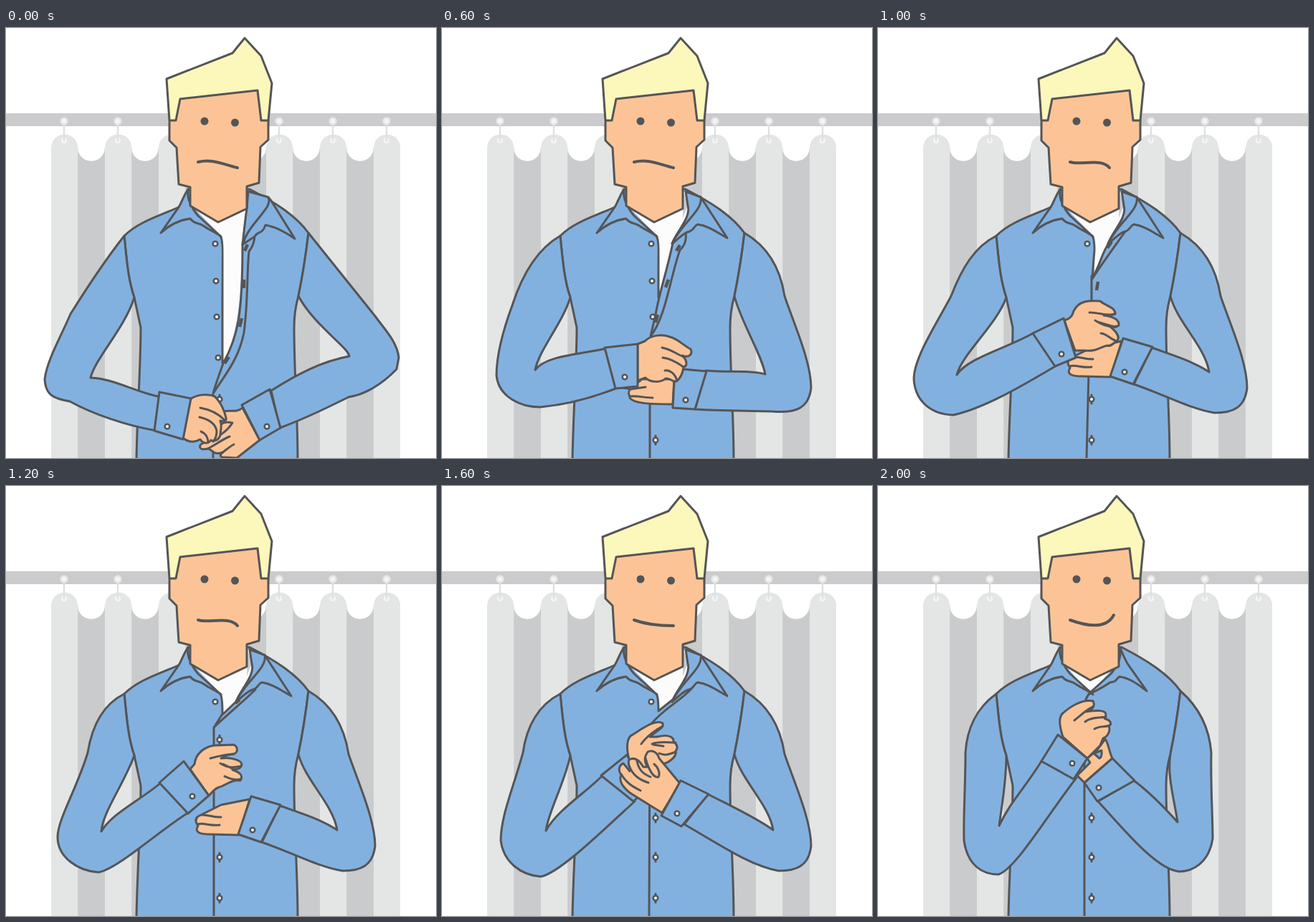
An HTML page without scripts that plays this animation: 600 px wide and 600 px high, repeating every 3000 ms.

```html
<!DOCTYPE html>
<html lang="en">
<head>
<meta charset="utf-8">
<title>Buttoning a shirt</title>
<style>
  html, body { margin: 0; width: 100%; height: 100%; overflow: hidden; background: #fff; }
  svg { display: block; width: 100vw; height: 100vh; }
  .ink { stroke: #545557; stroke-width: 3; stroke-linecap: round; stroke-linejoin: round; fill: none; }
  .shirt { fill: #82b1e0; }
  .skin { fill: #fcc496; }
  .tee { fill: #fcfcfc; stroke: none; }
  .hair { fill: #fcf7bb; }
  .dot { fill: #545557; stroke: none; }
  .hole { stroke-width: 4.5; stroke-linecap: butt; }
  .mouth { stroke-width: 4; }

  /* each pose is held for one 200 ms step, the last for five */
  .pose { visibility: hidden; animation: step 3s step-end calc(var(--i) * 200ms) infinite; }
  .last { animation-name: hold; }
  @keyframes step { 0% { visibility: visible; } 6.6667%, 100% { visibility: hidden; } }
  @keyframes hold { 0% { visibility: visible; } 33.3333%, 100% { visibility: hidden; } }
</style>
</head>
<body>
<svg viewBox="0 0 600 600">
<defs>
  <pattern id="folds" x="63" y="0" width="75" height="600" patternUnits="userSpaceOnUse">
    <path d="M37 167H75V600H37Z" fill="#cacbcd"/>
    <circle cx="56" cy="167" r="18.8" fill="#fff"/>
    <path d="M0 600V167A18.6 18.6 0 0 1 37.2 167V600Z" fill="#e4e6e5"/>
    <g fill="#f4f4f4" stroke="#e4e6e5" stroke-width="2.5">
      <circle cx="18" cy="157" r="3" stroke="#f4f4f4"/>
      <circle cx="18" cy="157" r="1.5" stroke="none" fill="#e4e6e5"/>
      <path d="M18 134V156" stroke="#dfe0e0"/>
      <circle cx="18" cy="130" r="4.5"/>
    </g>
  </pattern>

  <circle id="button" r="3.3" fill="#fff" stroke-width="2.6"/>
  <g id="done"><path d="M0-6V6"/><use href="#button"/></g>
  <g id="low"><use href="#done" x="298" y="518"/><use href="#done" x="298" y="575"/></g>

  <g id="head">
    <path class="skin" d="M228 129V157L238 167 241 218 257 222V248L296 271 336 252V221L353 216 355 166 366 156V129L351 80 243 90Z"/>
    <path class="hair" d="M224 71L316 35 333 14 356 39 371 77 366 129H356L351 87 243 99 237 129H228Z"/>
    <circle class="dot" cx="277" cy="130" r="5.5"/>
    <circle class="dot" cx="319.5" cy="132" r="5.5"/>
  </g>
  <path id="wing" class="shirt" d="M254 225C247 235 246 242 241 250L216 286C228 275 240 268 257 266C264 275 268 270 277 277C285 283 292 284 300 291L268 262C258 250 252 238 254 225Z"/>
  <g id="lapel">
    <path d="M337 228L343 248 336 265Z" fill="#cacbcd" stroke="none"/>
    <path class="shirt" d="M340 228L361 236 398 293C385 286 372 276 357 274C352 275 353 281 345 284C336 286 332 293 321 301C326 285 348 265 343 248Z"/>
    <path d="M361 236C365 254 333 274 321 301"/>
  </g>

  <g id="front0">
    <path class="tee" d="M257 246L300 290 302 468C320 435 328 400 330 300L338 228Z"/>
    <path d="M299 290Q302 294 302 310V467M330 301C330 400 324 430 303 468C297 485 292 498 289 510C305 485 325 462 332 425C338 380 336 340 339 312Q347 302 347 288M289 510V600"/>
    <path class="hole" d="M337 302L333 311M332 351V363M329 405L326 417M311 459L305 468"/>
    <use href="#button" x="292" y="301"/><use href="#button" x="293" y="353"/>
    <use href="#button" x="294" y="403"/><use href="#button" x="296" y="460"/>
    <use href="#done" x="298" y="518"/>
    <use href="#wing"/>
    <path class="shirt" d="M338 228L366 236 370 241 403 294C390 285 375 277 362 275C358 288 350 284 347 291L330 302C332 285 334 265 336 252Z"/>
    <path d="M366 237C374 250 337 274 331 301"/>
    <use href="#head"/>
  </g>
  <g id="front1">
    <path class="tee" d="M257 246L300 290 302 405C312 370 318 320 322 300L345 255 340 228Z"/>
    <path d="M299 290Q302 294 302 310V408M322 300C316 345 308 380 303 408L296 470M336 288C340 302 330 300 329 325C322 370 315 420 297 470M290 478L288 600"/>
    <path class="hole" d="M332 302L328 311M322 350L319 362M311 404L308 416"/>
    <use href="#button" x="292" y="301"/><use href="#button" x="293" y="353"/><use href="#button" x="294" y="403"/>
    <use href="#wing"/><use href="#lapel"/><use href="#head"/>
  </g>
  <g id="front2">
    <path class="tee" d="M257 246L300 290 302 375C310 345 316 320 322 300L345 255 340 228Z"/>
    <use href="#button" x="292" y="301"/><use href="#button" x="293" y="353"/><use href="#button" x="294" y="403"/>
    <path d="M299 290Q302 294 302 310V376M322 300C315 335 303 370 298 400L291 430C312 405 319 345 332 310Q342 300 340 287M290 440V600"/>
    <path class="hole" d="M332 303L327 311M316 351L312 362M301 400L298 411"/>
    <use href="#done" x="298" y="575"/>
    <use href="#wing"/><use href="#lapel"/><use href="#head"/>
  </g>
  <g id="front3">
    <path class="tee" d="M257 246L300 290 302 340 322 300 345 255 340 228Z"/>
    <path d="M299 290Q302 294 302 310L299 348M322 300C312 315 310 330 299 350C315 325 330 305 345 284M298 346V385M294 480L291 600"/>
    <path class="hole" d="M326 298L320 307M307 354L305 366"/>
    <use href="#button" x="292" y="301"/><use href="#low"/>
    <use href="#wing"/><use href="#lapel"/><use href="#head"/>
  </g>
  <g id="front4">
    <path class="tee" d="M257 246L300 290 302 319 322 300 345 255 340 228Z"/>
    <path d="M299 290Q302 294 302 318L290 337V600M302 319L322 300M290 337C305 322 330 302 348 284"/>
    <path class="hole" d="M326 298L320 303"/>
    <use href="#button" x="292" y="301"/><use href="#done" x="298" y="354"/><use href="#low"/>
    <use href="#wing"/><use href="#lapel"/><use href="#head"/>
  </g>
  <g id="front5">
    <path class="tee" d="M257 246L300 290 302 314 322 300 345 255 340 228Z"/>
    <path d="M299 290Q302 294 302 314L322 298M292 332C310 310 330 302 348 283M290 340L289 600"/>
    <use href="#button" x="292" y="301"/><use href="#done" x="298" y="463"/><use href="#low"/>
    <use href="#wing"/><use href="#lapel"/><use href="#head"/>
  </g>
  <g id="front6">
    <path class="tee" d="M257 246L296 289 336 246Z"/>
    <path d="M296 289Q288 296 288 310V600"/>
    <use href="#done" x="298" y="463"/><use href="#low"/>
    <use href="#wing"/>
    <path class="shirt" d="M338 226C342 236 346 246 351 252L375 286C364 278 352 268 337 266C331 270 334 273 324 274C315 280 306 286 294 290L325 262C335 250 340 238 338 226Z"/>
    <use href="#head"/>
  </g>

  <!-- sleeves: ls on the left of the stage, rs on the right -->
  <path id="ls0" class="shirt" d="M165 290C138 324 112 364 90 399C76 432 57 464 54 490C55 512 66 517 89 521C120 538 165 554 210 562L216 515C180 508 150 489 118 488C125 460 165 420 179 376C170 350 168 320 165 290Z"/>
  <path id="ls1" class="shirt" d="M165 290C130 310 110 350 98 387C80 430 67 470 67 492C69 520 90 525 115 527C160 530 205 527 250 531L240 476C200 472 160 475 128 473C132 450 168 415 179 376C170 350 168 320 165 290Z"/>
  <path id="ls2" class="shirt" d="M165 290C130 310 110 350 98 387C84 425 76 460 76 485C79 515 110 529 137 529C180 525 220 512 245 502L230 447C190 456 145 457 130 477C135 450 168 412 179 376C170 350 168 320 165 290Z"/>
  <path id="ls3" class="shirt" d="M165 290C135 305 117 335 102 374C82 412 50 460 50 490C52 522 75 539 105 540C150 530 205 497 249 471L218 425C180 447 125 460 110 484C117 455 165 415 179 376C170 350 168 320 165 290Z"/>
  <path id="ls4" class="shirt" d="M165 290C135 305 120 335 114 372C100 420 72 465 72 490C72 518 100 537 129 539C155 535 215 480 254 456L216 414C190 437 148 456 133 482C135 455 165 415 179 376C170 350 168 320 165 290Z"/>
  <path id="ls5" class="shirt" d="M165 290C135 305 118 335 113 372C100 420 82 460 82 495C86 525 110 543 138 545C165 540 230 475 269 440L224 404C198 430 160 453 145 481C148 455 171 415 179 376C170 350 168 320 165 290Z"/>
  <path id="ls6" class="shirt" d="M165 290C137 310 124 340 122 372C122 420 119 460 120 495C125 529 145 542 168 542C192 535 240 454 277 407L228 384C206 420 185 440 169 474C172 450 179 415 179 376C170 350 168 320 165 290Z"/>
  <path id="rs0" class="shirt" d="M422 286L515 402C528 420 546 438 548 460L545 476C525 497 500 512 478 515C448 530 415 546 382 558L370 506C405 484 440 465 479 458C478 446 430 415 408 374C414 345 418 320 422 286Z"/>
  <path id="rs1" class="shirt" d="M422 286C455 305 472 335 478 374C492 410 505 460 507 489C490 508 470 515 448 522C418 540 388 558 357 573L344 521C380 500 410 476 441 471C437 450 420 410 408 374C414 345 418 320 422 286Z"/>
  <path id="rs2" class="shirt" d="M422 286C455 305 472 335 478 374C490 410 515 465 515 502C512 530 495 538 460 535C420 534 385 534 353 532L368 478C400 481 430 477 451 483C446 455 417 410 408 374C414 345 418 320 422 286Z"/>
  <path id="rs3" class="shirt" d="M422 286C455 305 472 335 478 374C490 410 515 465 515 502C512 530 495 537 470 537C440 533 400 512 357 497L382 446C410 456 440 465 462 480C457 445 417 410 408 374C414 345 418 320 422 286Z"/>
  <path id="rs4" class="shirt" d="M422 286C455 305 472 335 478 374C490 410 515 465 515 502C512 530 495 537 470 537C435 535 390 524 352 514L379 465C410 467 442 469 462 480C457 445 417 410 408 374C414 345 418 320 422 286Z"/>
  <path id="rs5" class="shirt" d="M422 286C455 305 472 335 478 374C490 410 515 465 515 502C512 530 495 537 470 537C430 530 385 499 338 472L371 430C402 446 437 462 462 480C457 445 417 410 408 374C414 345 418 320 422 286Z"/>
  <path id="rs6" class="shirt" d="M422 286C446 307 462 335 465 372C464 420 467 460 467 492C462 525 440 538 420 538C388 535 342 478 307 440L357 411C380 428 400 449 418 469C414 440 403 405 408 374C414 345 418 320 422 286Z"/>

  <!-- hands with their cuffs -->
  <g id="lh0">
    <path class="skin" d="M257 518C266 511 283 510 291 514C299 521 305 534 307 544C308 550 302 549 299 548C302 556 299 562 299 568C297 575 290 578 286 575C282 581 275 580 271 574C262 579 254 578 247 572Z"/>
    <path d="M271 530C283 532 295 537 305 547M270 543C283 546 292 552 294 562Q294 572 289 577M272 563C279 566 281 570 282 577"/>
    <path class="shirt" d="M214 508L258 517 247 574 207 562Z"/><use href="#button" x="225" y="556"/>
  </g>
  <g id="lh1">
    <path class="skin" d="M282 477C296 476 303 466 318 466C333 469 347 484 349 494C348 502 343 502 341 500C347 508 342 514 335 513C341 524 334 530 328 527C322 523 318 531 312 532C300 536 294 527 283 527Z"/>
    <path d="M316 485C328 486 335 494 342 501M313 500C322 501 330 508 336 514M316 515C324 517 325 523 328 527"/>
    <path class="shirt" d="M236 476L281 471 283 530 249 531Z"/><use href="#button" x="264" y="518"/>
  </g>
  <g id="lh2">
    <path class="skin" d="M273 441L283 437C292 428 308 427 318 431C330 434 338 444 347 448C350 455 345 461 335 457C342 463 343 472 337 473C336 481 333 489 327 493C321 494 318 488 312 489C306 495 290 495 284 488L273 492Z"/>
    <path d="M307 446C320 448 328 456 338 459M308 460C318 461 330 468 337 473M311 478C318 477 325 482 328 492"/>
    <path class="shirt" d="M227 446L273 441V500L242 503Z"/><use href="#button" x="255" y="487"/>
  </g>
  <g id="lh3">
    <path class="skin" d="M260 408C269 405 271 402 273 395C280 380 295 380 310 381C318 388 330 389 331 398C328 402 320 401 315 401C330 403 337 407 336 415C332 418 328 416 322 415C332 423 338 430 334 436C328 440 325 445 320 443C310 445 305 452 288 450L275 450Z"/>
    <path d="M295 397C305 396 320 403 331 399M303 408C312 414 322 418 333 417M306 410L323 415M311 426C320 427 324 434 331 436"/>
    <path class="shirt" d="M216 426L259 405 276 460 247 472Z"/><use href="#button" x="256" y="455"/>
  </g>
  <g id="lh4">
    <path class="skin" d="M257 395L263 388C265 372 278 364 290 362L318 361C325 365 323 373 317 374C308 375 303 378 300 380C315 378 328 383 329 388C328 396 320 395 316 396C328 400 331 405 327 411C315 409 306 418 298 420C290 422 288 428 283 432Z"/>
    <path d="M285 380C300 376 310 374 318 374M299 387C310 394 318 393 328 391M303 388L317 395M305 405C312 408 318 411 327 409"/>
    <path class="shirt" d="M214 414L248 384 283 432 254 457Z"/><use href="#button" x="260" y="433"/>
  </g>
  <g id="lh5">
    <path class="skin" d="M262 384C256 365 258 350 266 347C280 338 298 325 308 331C310 338 300 341 290 350L300 350C315 346 324 350 323 357C328 360 330 365 326 370C328 378 315 388 305 388L290 410Z"/>
    <path d="M278 360C285 350 298 340 308 335M293 360C300 356 315 358 326 358M295 361L309 363M303 373C312 377 318 374 326 371"/>
    <path class="shirt" d="M222 404L258 375 284 425 267 440Z"/>
  </g>
  <g id="lh6">
    <path class="skin" d="M258 350C253 335 252 322 258 317C268 308 285 297 300 300C304 308 298 313 290 315C305 313 318 312 318 319C318 323 314 325 318 325C326 328 326 333 322 335C325 342 320 350 314 352L310 362 292 380Z"/>
    <path d="M274 327C283 320 292 311 300 308M289 329C297 322 310 324 318 322M302 339C309 334 316 337 323 334"/>
    <path class="shirt" d="M251 347L292 380 273 409 228 384Z"/><use href="#button" x="271" y="387"/>
  </g>
  <g id="rh0">
    <path class="skin" d="M330 530C321 538 311 532 304 535L296 560 284 575C278 579 273 579 271 582C269 589 276 588 283 587L290 592C294 595 298 593 303 592C296 596 300 600 306 599L322 600 354 575Z"/>
    <path d="M300 553C306 549 311 550 316 551C309 562 298 570 284 575M312 570C300 575 292 582 281 587M318 581C312 584 307 589 301 593"/>
    <path class="shirt" d="M329 526L368 504 383 558 354 575Z"/><use href="#button" x="364" y="556"/>
  </g>
  <g id="rh1">
    <path class="skin" d="M304 542L288 548C275 545 262 546 256 548C249 553 252 560 262 561C270 562 278 559 284 560L280 565C270 570 250 574 244 580C240 588 245 592 253 590L246 593C240 598 243 602 250 602L290 604 327 588Z"/>
    <path d="M274 576C265 578 262 588 251 590M280 585C268 588 266 597 255 600"/>
    <path class="shirt" d="M304 543L344 521 357 574 328 590Z"/><use href="#button" x="338" y="570"/>
  </g>
  <g id="rh2">
    <path class="skin" d="M324 490H278C275 498 255 498 247 501L263 504C257 510 263 512 262 516C268 525 300 525 322 525Z"/>
    <path d="M263 504L284 501M262 514C275 513 282 516 294 516"/>
    <path class="shirt" d="M325 475L369 479 353 532 322 530Z"/><use href="#button" x="340" y="519"/>
  </g>
  <g id="rh3">
    <path class="skin" d="M340 437L300 445 268 461C263 465 265 470 268 474C262 484 272 486 285 486L325 487Z"/>
    <path d="M273 459C282 458 290 463 300 462M267 472C276 469 285 475 298 473"/>
    <path class="shirt" d="M342 433L383 445 356 497 324 486Z"/><use href="#button" x="344" y="480"/>
  </g>
  <g id="rh4">
    <path class="skin" d="M337 456C325 448 315 430 301 422C292 419 286 427 291 433L297 441C285 440 278 433 270 436C264 440 268 450 270 454L258 443C252 446 254 455 260 461C260 475 270 485 282 491L321 503Z"/>
    <path d="M290 432C295 444 303 457 312 457C319 450 315 440 307 434M280 437C285 450 290 453 302 456M268 442C272 457 282 463 296 466M258 456C265 467 275 474 287 479"/>
    <path class="shirt" d="M338 452L380 464 351 516 319 504Z"/><use href="#button" x="340" y="498"/>
  </g>
  <g id="rh5">
    <path class="skin" d="M332 415L303 380C300 370 292 368 287 371C282 378 282 385 287 392L281 392C275 382 268 378 261 382C258 390 265 395 262 398L253 387C246 390 246 398 250 403C246 412 252 420 262 428L307 456Z"/>
    <path d="M284 380C288 395 295 408 302 406C305 400 301 392 296 388M272 384C275 398 282 402 291 406M261 390C266 404 276 410 288 414M250 402C257 414 265 419 277 425"/>
    <path class="shirt" d="M333 411L372 430 334 475 306 460Z"/><use href="#button" x="328" y="457"/>
  </g>
  <g id="rh6">
    <path class="skin" d="M327 380C322 370 322 360 317 353L306 368 292 380 296 386 278 404 288 414Z"/>
    <path class="shirt" d="M301 373L312 369Q313 378 309 380Z"/>
    <path class="shirt" d="M327 380L358 411 306 440 288 414Z"/><use href="#button" x="308" y="421"/>
  </g>

  <path id="frown" class="mouth" d="M268 187C289 182 305 191 323 195"/>
  <path id="doubt" class="mouth" d="M268 187C283 192 312 181 323 195"/>
  <path id="calm" class="mouth" d="M268 187Q290 195 323 195"/>
  <path id="grin" class="mouth" d="M268 187C290 194 312 199 326 188"/>
  <path id="smile" class="mouth" d="M268 187C290 195 318 201 329 180"/>
</defs>

<path d="M0 119H600V137H0Z" fill="#cbcbcd"/>
<path d="M63 119H550V600H63Z" fill="url(#folds)"/>

<g class="ink">
  <path class="shirt" d="M182 602C183 540 188 470 188 418L179 376C170 350 168 320 165 290C185 270 215 262 243 249L254 225H340C375 243 405 262 422 286C418 320 414 345 408 374Q402 395 402 418C402 480 407 540 407 602Z"/>

  <g class="pose" style="--i:0"><use href="#front0"/><use href="#ls0"/><use href="#rs0"/><use href="#rh0"/><use href="#lh0"/><use href="#frown"/></g>
  <g class="pose" style="--i:1"><use href="#front1"/><use href="#ls1"/><use href="#rs1"/><use href="#lh1"/><use href="#rh1"/><use href="#frown"/></g>
  <g class="pose" style="--i:2"><use href="#front1"/><use href="#ls1"/><use href="#rs1"/><use href="#lh1" transform="rotate(-5 240 505)"/><use href="#rh1"/><use href="#frown"/></g>
  <g class="pose" style="--i:3"><use href="#front2"/><use href="#ls2"/><use href="#rs2"/><use href="#rh2"/><use href="#lh2"/><use href="#frown"/></g>
  <g class="pose" style="--i:4"><use href="#front2"/><use href="#ls2"/><use href="#rs2"/><use href="#rh2"/><use href="#lh2" transform="rotate(-7 236 475)"/><use href="#frown"/></g>
  <g class="pose" style="--i:5"><use href="#front3"/><use href="#ls3"/><use href="#rs3"/><use href="#rh3"/><use href="#lh3"/><use href="#doubt"/></g>
  <g class="pose" style="--i:6"><use href="#front4"/><use href="#ls4"/><use href="#rs3"/><use href="#rh3"/><use href="#lh4"/><use href="#doubt"/></g>
  <g class="pose" style="--i:7"><use href="#front4"/><use href="#ls4"/><use href="#rs4"/><use href="#lh4"/><use href="#rh4"/><use href="#doubt"/></g>
  <g class="pose" style="--i:8"><use href="#front5"/><use href="#ls5"/><use href="#rs5"/><use href="#lh5"/><use href="#rh5"/><use href="#calm"/></g>
  <g class="pose" style="--i:9"><use href="#front5"/><use href="#ls6"/><use href="#rs6"/><use href="#rh6" y="4"/><use href="#lh6" y="4"/><use href="#grin"/></g>
  <g class="pose last" style="--i:10"><use href="#front6"/><use href="#ls6"/><use href="#rs6"/><use href="#rh6"/><use href="#lh6"/><use href="#smile"/></g>
</g>
</svg>
</body>
</html>
```
